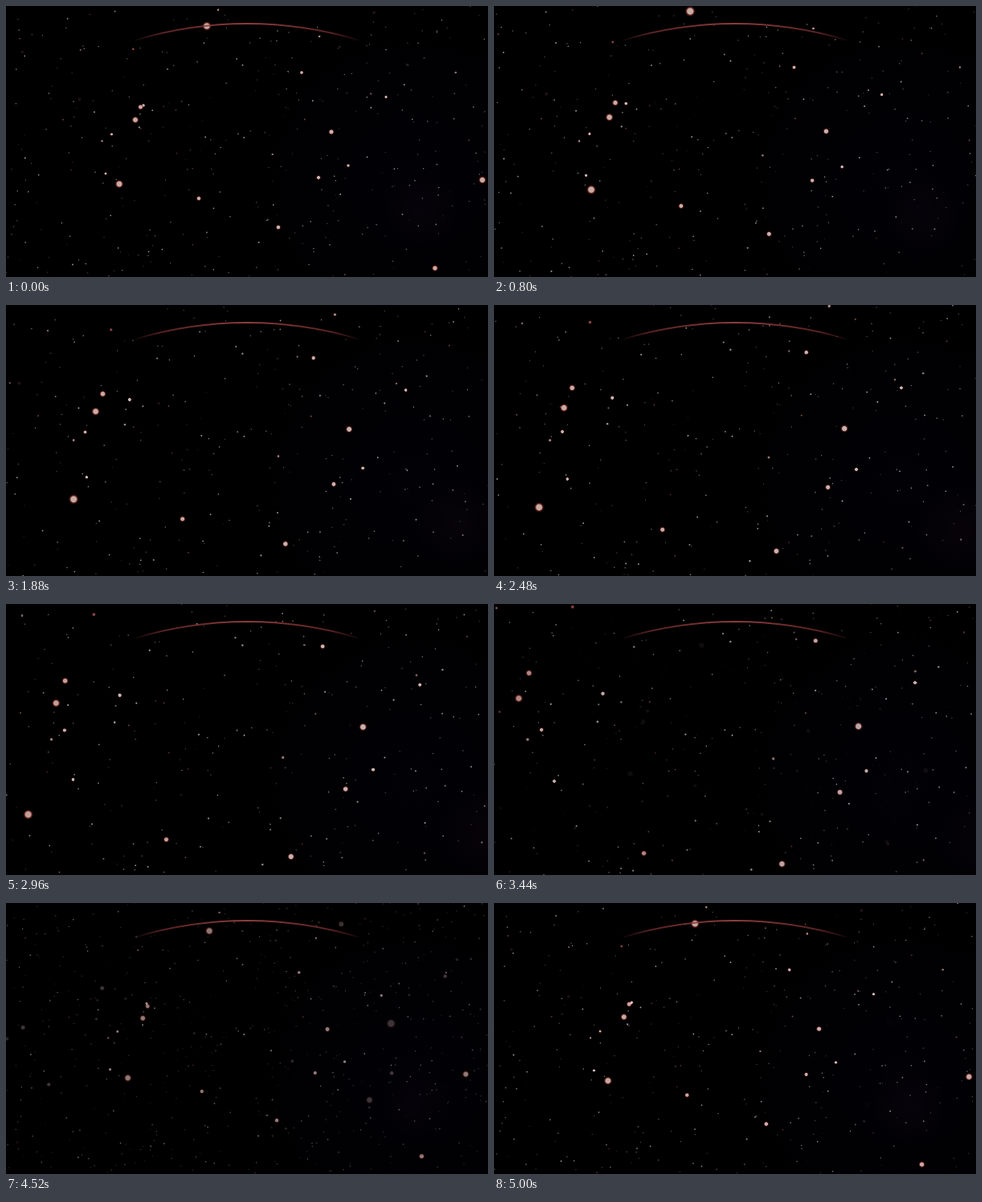
An HTML page with a canvas for the animation above (5040 ms loop, 600x338 px).

```html
<!DOCTYPE html>
<html lang="en">
<head>
<meta charset="utf-8">
<title>Star drift</title>
<style>
  html, body { margin: 0; width: 100%; height: 100%; overflow: hidden; background: #000; }
  canvas { display: block; width: 600px; height: 338px; }
</style>
</head>
<body>
<canvas id="stage" width="600" height="338"></canvas>
<script>
const ctx = document.getElementById('stage').getContext('2d');
const W = 600, H = 338;
const VANISH = { x: 295, y: 167 };
const LOOP = 5040, STEP = 40, FADE_START = 3320, FADE_TIME = 1700;
const LAYERS = 8;

const clamp = v => Math.min(1, Math.max(0, v));
const mix = (a, b, u) => a + (b - a) * u;

let seed = 71;
const random = () => {
  seed = (seed * 16807) % 2147483647;
  return seed / 2147483647;
};

// Time until a star of this layer would reach the viewer; layers are evenly spaced.
const reachOf = layer => 2745 + 4235 * layer;

// The brightest stars, largest first; sizes fall evenly along each list.
const landmarks = (layer, size, fall, points) => points.map(([x, y], i) =>
  ({ x, y, size: size - fall * i, reach: reachOf(layer), glow: 1.1 - layer * 0.25, alpha: 1, red: 0 }));

// Every layer is filled with small stars, denser and finer with distance.
function scatter(layer) {
  const count = Math.round(Math.min(80, 3.5 * layer * layer));
  return Array.from({ length: count }, () => {
    const light = random();
    return {
      x: W / 2 + (random() - 0.5) * 660,
      y: H / 2 + (random() - 0.5) * 372,
      size: (0.4 + 1.6 / layer) * (0.7 + 0.5 * light),
      reach: reachOf(layer),
      glow: layer < 3 ? 0.5 : 0,
      alpha: layer < 2 ? 0.2 : 0.35 + 0.5 * light,
      red: random() < 0.5 / layer ? 0.75 : random() * 0.15
    };
  });
}

const stars = [];
for (let layer = LAYERS; layer > 0; layer--) stars.push(...scatter(layer));
stars.push(
  ...landmarks(3, 1.9, 0.08, [[171, 124], [426, 199], [473, 113.5], [124, 209]]),
  ...landmarks(2, 2.8, 0.3, [[405, 157], [339, 276], [389, 214], [368, 83], [131.5, 160]]),
  ...landmarks(1, 4.1, 0.3, [[250, 25], [141, 222], [593, 217], [161, 142], [534, 327], [167.5, 126], [240, 240]])
);

function place(star, t) {
  const zoom = star.reach / (star.reach - t);
  return {
    x: VANISH.x + (star.x - VANISH.x) * zoom,
    y: VANISH.y + (star.y - VANISH.y) * zoom,
    r: star.size * Math.min(zoom, star.reach / 6000)
  };
}

function disc(x, y, r, fill) {
  ctx.fillStyle = fill;
  ctx.beginPath();
  ctx.arc(x, y, r, 0, Math.PI * 2);
  ctx.fill();
}

function glow(x, y, r, stops) {
  const g = ctx.createRadialGradient(x, y, 0, x, y, r);
  stops.forEach(([at, color]) => g.addColorStop(at, color));
  disc(x, y, r, g);
}

function drawStar(star, t, opacity) {
  const { x, y, r } = place(star, t);
  if (x < -20 || x > W + 20 || y < -20 || y > H + 20) return;

  // Stars redden as they come close.
  const near = clamp((4500 - star.reach + t) / 2500);
  const red = Math.max(star.red, near * 0.6);
  const warm = clamp(star.glow);
  const core = `rgb(${mix(200, 150, red)},${mix(mix(194, 168, warm), 55, red)},${mix(mix(200, 158, warm), 50, red)})`;

  ctx.globalAlpha = opacity * star.alpha;
  if (!star.glow) {
    disc(x, y, r, core);
    return;
  }
  glow(x, y, r * 1.45, [
    [0, core],
    [0.52, core],
    [0.7, `rgba(125,48,42,${star.glow})`],
    [1, 'rgba(80,18,18,0)']
  ]);
}

function drawField(t, opacity) {
  if (opacity <= 0) return;
  ctx.globalAlpha = opacity;
  const cloud = place({ x: 518, y: 255, size: 46, reach: reachOf(2) }, t);
  glow(cloud.x, cloud.y, cloud.r, [[0, 'rgba(26,10,30,.22)'], [1, 'rgba(26,10,30,0)']]);
  stars.forEach(star => drawStar(star, t, opacity));
}

function drawArc() {
  const radius = 479, half = Math.asin(139 / radius);
  const up = -Math.PI / 2;
  const g = ctx.createLinearGradient(161, 0, 439, 0);
  g.addColorStop(0, 'rgba(120,45,45,.1)');
  g.addColorStop(0.12, 'rgba(125,48,48,.7)');
  g.addColorStop(0.5, '#8c3d3d');
  g.addColorStop(0.88, 'rgba(125,48,48,.7)');
  g.addColorStop(1, 'rgba(120,45,45,.1)');
  ctx.strokeStyle = g;
  ctx.lineWidth = 1.9;
  ctx.beginPath();
  ctx.arc(W / 2, 22 + radius, radius, up - half, up + half);
  ctx.stroke();
}

function draw(t) {
  ctx.globalCompositeOperation = 'source-over';
  ctx.globalAlpha = 1;
  ctx.fillStyle = '#000001';
  ctx.fillRect(0, 0, W, H);
  glow(510, 220, 190, [[0, 'rgba(10,6,26,.2)'], [1, 'rgba(10,6,26,0)']]);

  // The next pass of the field fades in over the current one, closing the loop.
  const fade = clamp((t - FADE_START) / FADE_TIME);
  if (fade > 0) ctx.globalCompositeOperation = 'lighter';
  drawField(t, 1 - fade);
  drawField(t - LOOP, fade);

  ctx.globalCompositeOperation = 'source-over';
  ctx.globalAlpha = 1;
  drawArc();
}

const start = performance.now();
function tick() {
  const t = (performance.now() - start) % LOOP;
  draw(Math.floor(t / STEP) * STEP);
  requestAnimationFrame(tick);
}
tick();
</script>
</body>
</html>
```
